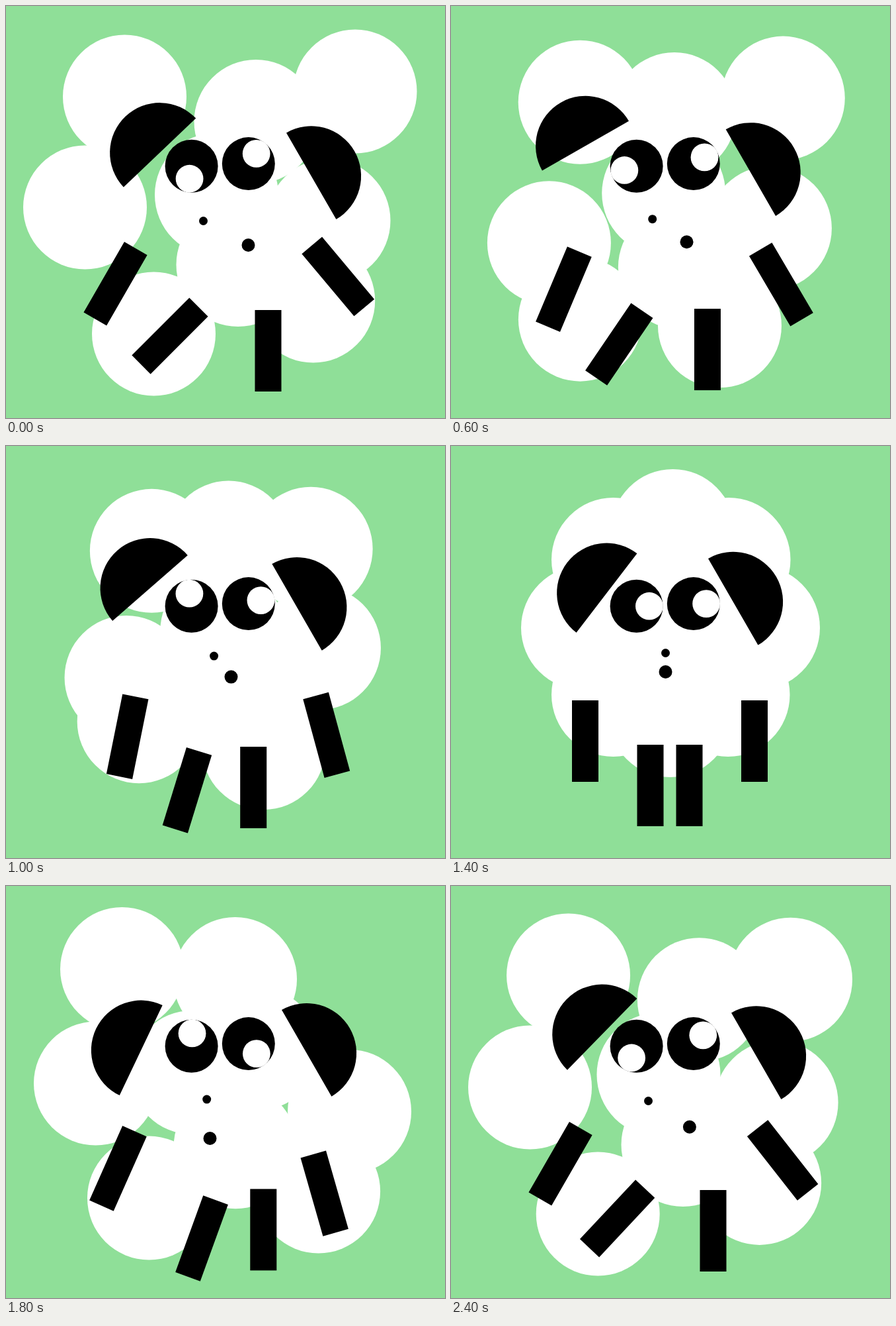
Write an HTML page with a canvas that moves like this. It is 664x622 px and loops after 2450 ms.

```html
<!DOCTYPE html>
<html>
<head>
<meta charset="utf-8">
<title>Sheep falling apart and together</title>
<style>
  html, body { margin: 0; height: 100%; overflow: hidden; background: #8fdf98; }
  canvas { display: block; }
</style>
</head>
<body>
<canvas id="stage" width="664" height="622"></canvas>
<script>
const ctx = document.getElementById('stage').getContext('2d');
const LOOP = 2450, STEP = 50, WHITE = '#fff', BLACK = '#000';
const PIVOT = [332, 311];
const rad = deg => deg * Math.PI / 180;

// Each part is at start, nudged at 350 ms, assembled at 1400 ms, scattered at 1900 ms.
const track = (start, home, scatter = start, nudge = start, extra = []) =>
  [[0, start], [350, nudge], ...extra, [1400, home], [1900, scatter], [LOOP, start]];

function at(keys, t) {
  const i = keys.findIndex(key => key[0] > t);
  const [t0, from] = keys[i - 1], [t1, to] = keys[i];
  return from.map((v, k) => v + (to[k] - v) * (t - t0) / (t1 - t0));
}

const wool = [
  track([179.5, 137], [245.5, 171.5], [158, 114]),
  track([378, 174.5], [335.5, 128.5], [349.3, 143.5], [338.5, 174.5]),
  track([528, 129], [420, 171.5], [369, 264.5]),
  track([119.5, 304], [199.5, 274.5], [119.5, 304], [158, 397.5],
    [[750, [142.6, 334]], [1100, [197.8, 355.7]]]),
  track([318.5, 285], [332, 275], [268.7, 283]),
  track([488, 324], [464.5, 274.5], [533.3, 357], [488, 354.5]),
  track([223.5, 495], [245.5, 375.5], [209.2, 495], [185, 420],
    [[750, [201.6, 505]], [1100, [201, 380]]]),
  track([351, 390.5], [331.5, 406.5]),
  track([464.7, 445], [419, 375.5], [486, 482.5], [464.7, 445],
    [[750, [371.5, 505.5]]]),
];

// Ears and legs: offset and turn (degrees) about the pivot.
const REST = [0, 0, 0];
const ears = [
  { x: 235.5, y: 222, tilt: 127.5,
    keys: track([-18.1, 13.5, 9], REST, [-18.6, 5, -15], [-97.4, 25.8, 30]) },
  { x: 426.7, y: 235.2, tilt: 240, keys: track([35, 21.5, 0], REST) },
];
const legs = [
  { x: 203, y: 445.5, keys: track([12.5, 56.2, 30], REST) },
  { x: 301.5, y: 512.5, keys: track([80, 66.1, 45], REST, [77, 52.6, 25]) },
  { x: 360.5, y: 512.5, keys: track([36, 8, 0], REST) },
  { x: 459, y: 445.5, keys: track([-13.5, 76, -40], REST, [-11.8, 73.5, -20]) },
];

// Pupils circle inside the eyes by an angle in degrees.
const eyes = [
  { x: 280.6, y: 241.7, keys: track([-261], [0], [-109]) },
  { x: 366.8, y: 238.1, keys: track([-52], [0], [64], [-39.6]) },
];
const dots = [
  { r: 6.5, keys: track([298.5, 324.5], [324.5, 312.5]) },
  { r: 10, keys: track([366.5, 361], [324.5, 341], [304.5, 391]) },
];

function disc(x, y, r, color, from = 0, sweep = 360) {
  ctx.fillStyle = color;
  ctx.beginPath();
  ctx.arc(x, y, r, rad(from), rad(from + sweep));
  ctx.fill();
}

function turned([dx, dy, deg], paint) {
  ctx.save();
  ctx.translate(PIVOT[0] + dx, PIVOT[1] + dy);
  ctx.rotate(rad(deg));
  ctx.translate(-PIVOT[0], -PIVOT[1]);
  paint();
  ctx.restore();
}

function draw(t) {
  ctx.fillStyle = '#8fdf98';
  ctx.fillRect(0, 0, 664, 622);
  for (const keys of wool) disc(...at(keys, t), 93.5, WHITE);
  for (const { x, y, tilt, keys } of ears)
    turned(at(keys, t), () => disc(x, y, 75.4, BLACK, tilt, 180));
  for (const { x, y, keys } of eyes) {
    const angle = rad(at(keys, t)[0]);
    disc(x, y, 40, BLACK);
    disc(x + 19.3 * Math.cos(angle), y + 19.3 * Math.sin(angle), 20.9, WHITE);
  }
  for (const { r, keys } of dots) disc(...at(keys, t), r, BLACK);
  for (const { x, y, keys } of legs)
    turned(at(keys, t), () => {
      ctx.fillStyle = BLACK;
      ctx.fillRect(x - 20, y - 61.5, 40, 123);
    });
}

let begin;
function tick(now) {
  begin ??= now;
  const t = Math.max(0, now - begin) % LOOP;
  draw(Math.floor(t / STEP) * STEP);
  requestAnimationFrame(tick);
}
draw(0);
requestAnimationFrame(tick);
</script>
</body>
</html>
```
